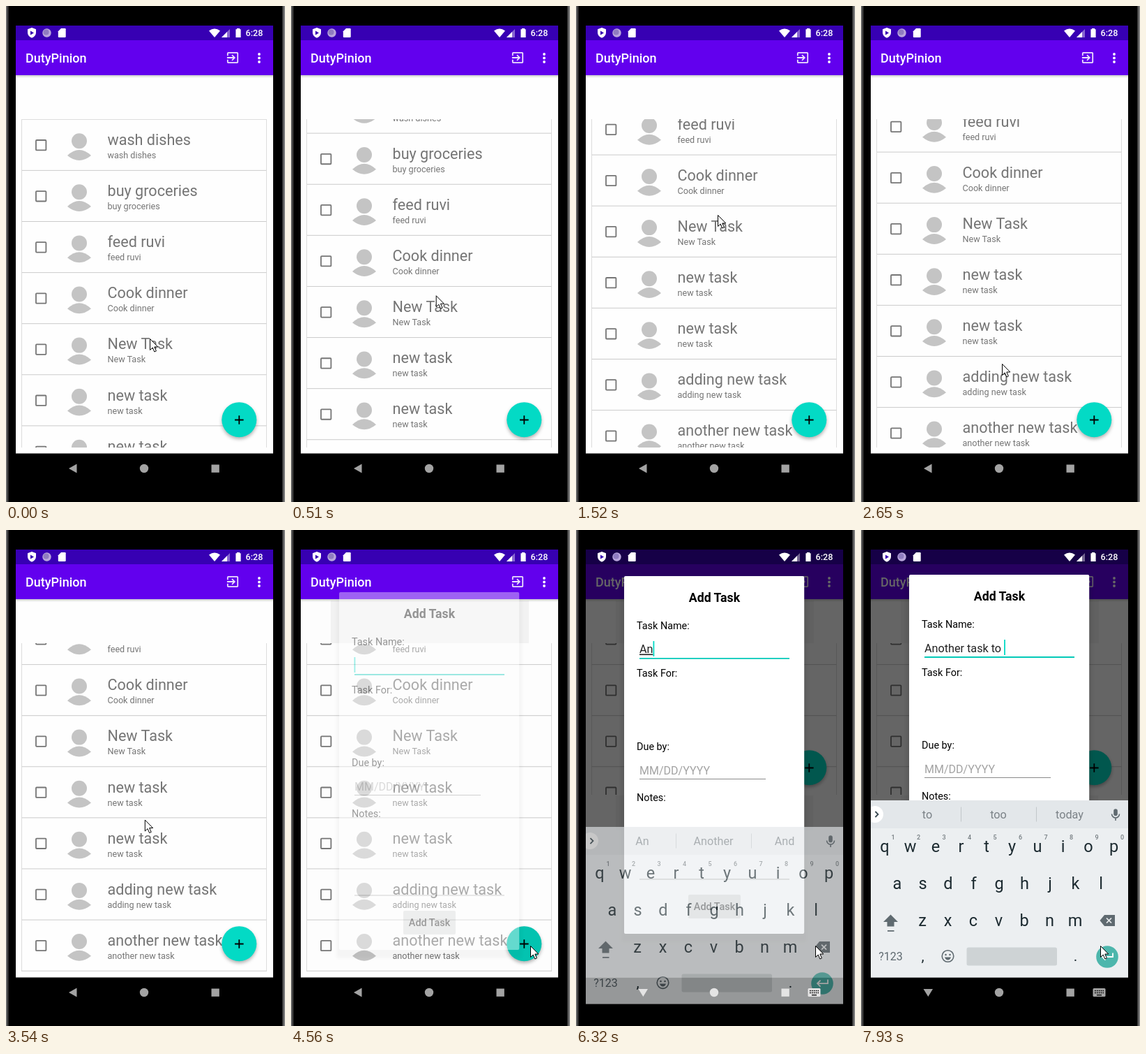
Animation, 400 px wide and 710 px high, one loop 7990 ms. Source, as an HTML page:

```html
<!DOCTYPE html>
<html lang="en">
<head>
<meta charset="utf-8">
<style>
html, body { margin: 0; width: 100%; height: 100%; overflow: hidden; background: #000; }
svg { display: block; width: 400px; height: 710px; font-family: Roboto, sans-serif; }
text { white-space: pre; }
.mid { text-anchor: middle; }
.med { font-weight: 500; }
</style>
</head>
<body>
<svg viewBox="0 0 400 710">
  <defs>
    <clipPath id="listClip"><rect id="listBox" x="22" y="162" width="353" height="470"/></clipPath>
    <clipPath id="screenClip"><rect x="14" y="28" width="369" height="651"/></clipPath>
    <filter id="soft" x="-30%" y="-30%" width="160%" height="160%"><feGaussianBlur stdDeviation="2.5"/></filter>
    <linearGradient id="barShade" x1="0" y1="0" x2="0" y2="1">
      <stop offset="0" stop-opacity=".2"/><stop offset="1" stop-opacity="0"/>
    </linearGradient>
  </defs>

  <rect width="400" height="710"/>
  <path d="M.5 0V710M399 0V710" stroke="#808080" stroke-width="2"/>
  <path d="M2.500 0V710M397 0V710" stroke="#444" stroke-width="2"/>

  <rect x="14" y="28" width="369" height="612.500" fill="#fefefe"/>
  <g id="shades">
    <rect x="57" y="101" width="284" height="61" fill-opacity=".045"/>
    <rect id="lowShade" x="57" y="380" width="283" height="50" fill-opacity=".045"/>
  </g>
  <rect x="14" y="99" width="369" height="4" fill="url(#barShade)"/>
  <rect x="14" y="28" width="369" height="21" fill="#3700b3"/>
  <rect x="14" y="49" width="369" height="50" fill="#6200ee"/>
  <text class="med" x="28" y="81" font-size="18" fill="#fff">DutyPinion</text>
  <path transform="translate(314.2 63.2) scale(.9)" fill="#fff" fill-opacity=".88" d="M10.1 15.6 11.5 17l5-5-5-5-1.4 1.4 2.6 2.6H3v2h9.7zM19 3H5a2 2 0 0 0-2 2v4h2V5h14v14H5v-4H3v4a2 2 0 0 0 2 2h14a2 2 0 0 0 2-2V5a2 2 0 0 0-2-2z"/>
  <g fill="#fff"><circle cx="363" cy="69" r="1.9"/><circle cx="363" cy="74.5" r="1.9"/><circle cx="363" cy="80" r="1.9"/></g>

  <g clip-path="url(#listClip)"><g id="rows"></g></g>

  <g id="fab">
    <circle cx="334.300" cy="595" r="25" fill-opacity=".3" filter="url(#soft)"/>
    <circle cx="334.300" cy="592.200" r="25" fill="#03dac5"/>
    <circle id="press" cx="334.300" cy="592.200" r="25" fill-opacity=".1"/>
    <path d="M328 592.500h12.600M334.300 586.200v12.600" stroke="#000" stroke-width="1.8"/>
  </g>

  <rect id="dim" x="14" y="28" width="369" height="612.500"/>

  <g fill="#fff">
    <path d="M37 31l6 2.300v4.500c0 3.700-2.500 6.700-6 7.900c-3.500-1.200-6-4.200-6-7.900v-4.500z"/>
    <path d="M35 35.500l5 3-5 3z" fill="#3700b3"/>
    <circle cx="58.500" cy="38.500" r="6.200" fill="#b9a6dc"/>
    <circle cx="57.500" cy="37.500" r="4" fill="#8f7cc0"/>
    <path d="M79 32h5.500a1.200 1.200 0 0 1 1.200 1.200v10.600a1.200 1.200 0 0 1-1.200 1.200h-8.500a1.200 1.200 0 0 1-1.200-1.200v-7.600z"/>
    <path d="M291 35.500q8-6 16 0l-8 9.500z"/>
    <path d="M321 33v12h-12z" opacity=".4"/><path d="M317 37v8h-8z"/>
    <path d="M331 32h4v1.200h1.600v11.800h-7.200v-11.800h1.600z"/>
    <text class="med" x="343.500" y="43" font-size="12.600">6:28</text>
  </g>

  <g id="dialog">
    <rect x="65" y="97" width="266" height="516" rx="3" fill-opacity=".09" filter="url(#soft)"/>
    <rect x="69" y="89" width="258.200" height="512" rx="2" fill="#fff"/>
    <text class="mid" x="198.500" y="126" font-size="17.700" font-weight="700">Add Task</text>
    <g id="labels" font-size="14.400"></g>
    <text id="entry" x="91" y="199.500" font-size="16.200" fill="#222"><tspan id="done"></tspan><tspan id="word" text-decoration="underline"></tspan></text>
    <rect id="caret" y="182" width="1.800" height="22" fill="#03dac5"/>
    <path d="M91 207H306" stroke="#03c9b8" stroke-width="1.800"/>
    <text x="91" y="373" font-size="16" fill="#a3a3a3">MM/DD/YYYY</text>
    <path d="M91 379.500H272M91 523H306" stroke="#8a8a8a"/>
    <rect x="161" y="545" width="75" height="34" rx="2" fill="#d6d7d7"/>
    <text class="mid med" x="198.500" y="567" font-size="14.400">Add Task</text>
  </g>

  <g clip-path="url(#screenClip)">
    <g id="keyboard">
      <rect x="14" y="387" width="369" height="253.500" fill="#eceff1"/>
      <rect x="14" y="387" width="369" height="40" fill="#e3e7ea"/>
      <circle cx="20" cy="407" r="12" fill="#fff"/>
      <path d="M20.500 403l4 4-4 4" fill="none" stroke="#37474f" stroke-width="1.800"/>
      <path d="M143.500 396.500v21M251.500 396.500v21" stroke="#c2c7ca"/>
      <g id="hints" font-size="16.200" fill="#7b8287"></g>
      <g fill="none" stroke="#5f6a70" stroke-width="1.600">
        <rect x="363" y="400" width="4" height="8.500" rx="2" fill="#5f6a70"/>
        <path d="M359.500 406.500a5.500 5.500 0 0 0 11 0M365 412v4"/>
      </g>
      <g id="keys"></g>
      <g fill="#5f6a70">
        <path d="M42.500 550.500l10.500 10.500h-5.500v6.500h-10v-6.500h-5.500zM38 573h9.500v1.800h-9.500z"/>
        <path d="M349 551h15v16h-15l-6.500-8z"/>
        <path d="M352 555.500l7 7m0-7l-7 7" stroke="#eceff1" stroke-width="1.700"/>
        <text class="mid" x="42.500" y="616" font-size="16">?123</text>
        <circle cx="121.500" cy="608" r="1.300"/><circle cx="127.500" cy="608" r="1.300"/>
        <path d="M120 611.500h9q-1.300 4-4.500 4t-4.500-4z"/>
      </g>
      <circle cx="124.500" cy="610" r="8.300" fill="none" stroke="#5f6a70" stroke-width="1.600"/>
      <rect x="151.500" y="597.500" width="129.500" height="26" rx="2.500" fill="#ced3d5"/>
      <circle cx="353" cy="611" r="15.800" fill="#4db6ac"/>
      <path d="M361 605.500v5.500h-15m4.500-4.500l-4.500 4.500 4.500 4.500" fill="none" stroke="#fff" stroke-width="1.800"/>
    </g>
  </g>

  <g id="nav" fill="#a3a3a3">
    <path id="back" d="M90 662l11.500-6.500v13z"/>
    <path id="down" d="M89.500 657h13.500l-6.700 11z"/>
    <circle cx="198" cy="662" r="6.200"/>
    <rect x="294.500" y="656.500" width="11.300" height="11.300"/>
    <g id="kbIcon">
      <rect x="332.500" y="656" width="18" height="12" rx="1.500"/>
      <path d="M335 659.500h13M335 662.500h13" stroke="#000" stroke-width="1.500" stroke-dasharray="1.700 1.200"/>
      <path d="M338 665.700h7" stroke="#000" stroke-width="1.300"/>
    </g>
  </g>

  <path id="pointer" d="M.5.500v16l3.700-3.500 2.600 6 2.600-1.100-2.600-5.900h5z" fill="#fff" stroke="#000"/>
</svg>
<script>
const $ = id => document.getElementById(id);
const LOOP = 7990, PITCH = 73.1, MAX_SCROLL = 189;

// bursts of movement: start, end, count of pictures
const BURSTS = [[50, 820, 14], [870, 1630, 14], [1880, 2340, 9], [2650, 3360, 12], [3480, 4120, 12]];
// pointer path: time, x, y
const PATH = [[0, 206, 476], [820, 209, 367], [1513, 203, 299], [1630, 203, 295], [1820, 203, 295],
  [2100, 215, 412], [2340, 202, 530], [2590, 202, 530], [2650, 202, 512], [3360, 172, 381],
  [3430, 172, 381], [4120, 343, 595]];
const FADE = [[4560, .38], [4610, .62], [4670, .85], [4730, 1]];
const DIM = [[4560, 0], [4610, .2], [4670, .42], [4730, .6]];
// keyboard entry: time, dialog pan, keyboard drop, keyboard opacity
const ENTRY = [[6140, 0, 39, 0], [6260, -12, 39, 0], [6320, -23, 38.5, .63], [6380, -25, 12, .93], [6440, -25, 0, 1]];

const TEXT = "Another task to ";
const TYPED = [6140, 6320, 6440, 6520, 6620, 6740, 6850, 6980, 7150, 7230, 7310, 7390, 7580, 7750, 7840, 7930];
const HINTS = ["A And All", "An Another And", "Ano Another Anon", "Anot Another Not", "Anoth Another Other",
  "Anothe Another Other", "Another Anothers Other", "one day thing", "t the to", "ta take talk", "tas task tasks",
  "task tasks tasked", "for to is", "t to the", "to too today", "to too today"];

const TASKS = ["wash dishes", "buy groceries", "feed ruvi", "Cook dinner", "New Task", "new task",
  "new task", "adding new task", "another new task"];

$("rows").innerHTML = TASKS.map((name, i) => `
  <g transform="translate(0 ${162 + i * PITCH})">
    <path d="M22.500 0V${PITCH}M373.500 0V${PITCH}" stroke="#ddd"/>
    <path d="M22 ${PITCH + .3}H374" stroke="#c6c6c6" stroke-width=".9"/>
    <rect x="43" y="30" width="14.400" height="14.400" rx="1" fill="none" stroke="#757575" stroke-width="1.800"/>
    <g fill="#c4c4c4"><circle cx="105" cy="31.200" r="11"/><path d="M88 52Q105 36 122 52Q105 66 88 52"/></g>
    <g fill="#757575"><text x="145.500" y="37" font-size="21.600">${name}</text>
    <text x="145.500" y="56" font-size="12.600">${name}</text></g>
  </g>`).join("") + `<path d="M22 162.500H374" stroke="#ddd"/>`;

$("labels").innerHTML = [["Task Name:", 165], ["Task For:", 233.5], ["Due by:", 338], ["Notes:", 411]]
  .map(([s, y]) => `<text x="87" y="${y}">${s}</text>`).join("");

const label = (s, x, y, size, fill, cls = "") =>
  `<text class="mid ${cls}" x="${x}" y="${y}" font-size="${size}" fill="${fill}">${s}</text>`;
const keyRow = (s, x, y) => [...s].map((c, i) => label(c, x + i * 36.5, y, 23.5, "#1c2a30")).join("");
$("keys").innerHTML = keyRow("qwertyuiop", 34, 461) + keyRow("asdfghjkl", 52, 513.5) + keyRow("zxcvbnm", 88, 566.5) +
  [..."1234567890"].map((c, i) => label(c, 46 + i * 36.5, 443, 9, "#747c80", "med")).join("") +
  label(",", 88.5, 617, 21, "#1c2a30") + label(".", 307.5, 617, 21, "#1c2a30");

$("hints").innerHTML = [95, 197, 299].map(x => `<text class="mid" x="${x}" y="413"></text>`).join("");
const hintCells = [...$("hints").children];

function at(table, t, col = 1) {
  if (t <= table[0][0]) return table[0][col];
  for (let i = 1; i < table.length; i++) {
    const a = table[i - 1], b = table[i];
    if (t < b[0]) return a[col] + (b[col] - a[col]) * (t - a[0]) / (b[0] - a[0]);
  }
  return table[table.length - 1][col];
}

// hold each picture of a burst until the next one
function snap(t) {
  let held = 0;
  for (const [a, b, n] of BURSTS) {
    if (t < a) break;
    const d = (b - a) / (n - 1);
    held = t >= b ? b : a + Math.floor((t - a) / d) * d;
  }
  return held;
}

const show = (id, on) => $(id).style.display = on ? "" : "none";
const shift = (id, x, y) => $(id).setAttribute("transform", `translate(${x} ${y})`);

function drawEntry(t) {
  const n = TYPED.filter(s => t >= s).length;
  const typed = TEXT.slice(0, n), cut = typed.lastIndexOf(" ") + 1;
  $("done").textContent = typed.slice(0, cut);
  $("word").textContent = typed.slice(cut);
  $("caret").setAttribute("x", n ? 91 + $("entry").getComputedTextLength() : 90.5);
  show("caret", n || t < 4960 || (t >= 5460 && t < 5960));
  const words = HINTS[Math.max(0, n - 1)].split(" ");
  hintCells.forEach((cell, i) => cell.textContent = words[i]);
}

function draw(t) {
  const s = snap(t), y = u => at(PATH, u, 2);
  shift("pointer", at(PATH, s), y(s));
  const first = Math.max(0, 467.5 - y(Math.min(s, 1630)));
  const second = 512 - y(Math.min(3360, Math.max(2650, s)));
  shift("rows", 0, -Math.min(MAX_SCROLL, first + second));

  const open = t >= 4560, resized = t >= 6260;
  show("dialog", open);
  show("shades", open);
  show("press", open && t < 4730);
  show("lowShade", resized);
  $("dialog").setAttribute("opacity", at(FADE, t));
  $("dim").setAttribute("opacity", at(DIM, t));
  shift("dialog", 0, at(ENTRY, t));
  shift("keyboard", 0, at(ENTRY, t, 2));
  $("keyboard").setAttribute("opacity", at(ENTRY, t, 3));
  show("keyboard", resized);
  shift("fab", 0, resized ? -252 : 0);
  $("listBox").setAttribute("height", resized ? 217 : 470);
  show("back", !resized);
  show("down", resized);
  show("kbIcon", resized);
  $("nav").setAttribute("fill", resized && t < 6380 ? "#e4e4e4" : "#a3a3a3");
  drawEntry(t);
}

const start = performance.now();
function tick() {
  draw((performance.now() - start) % LOOP);
  requestAnimationFrame(tick);
}
tick();
</script>
</body>
</html>
```
